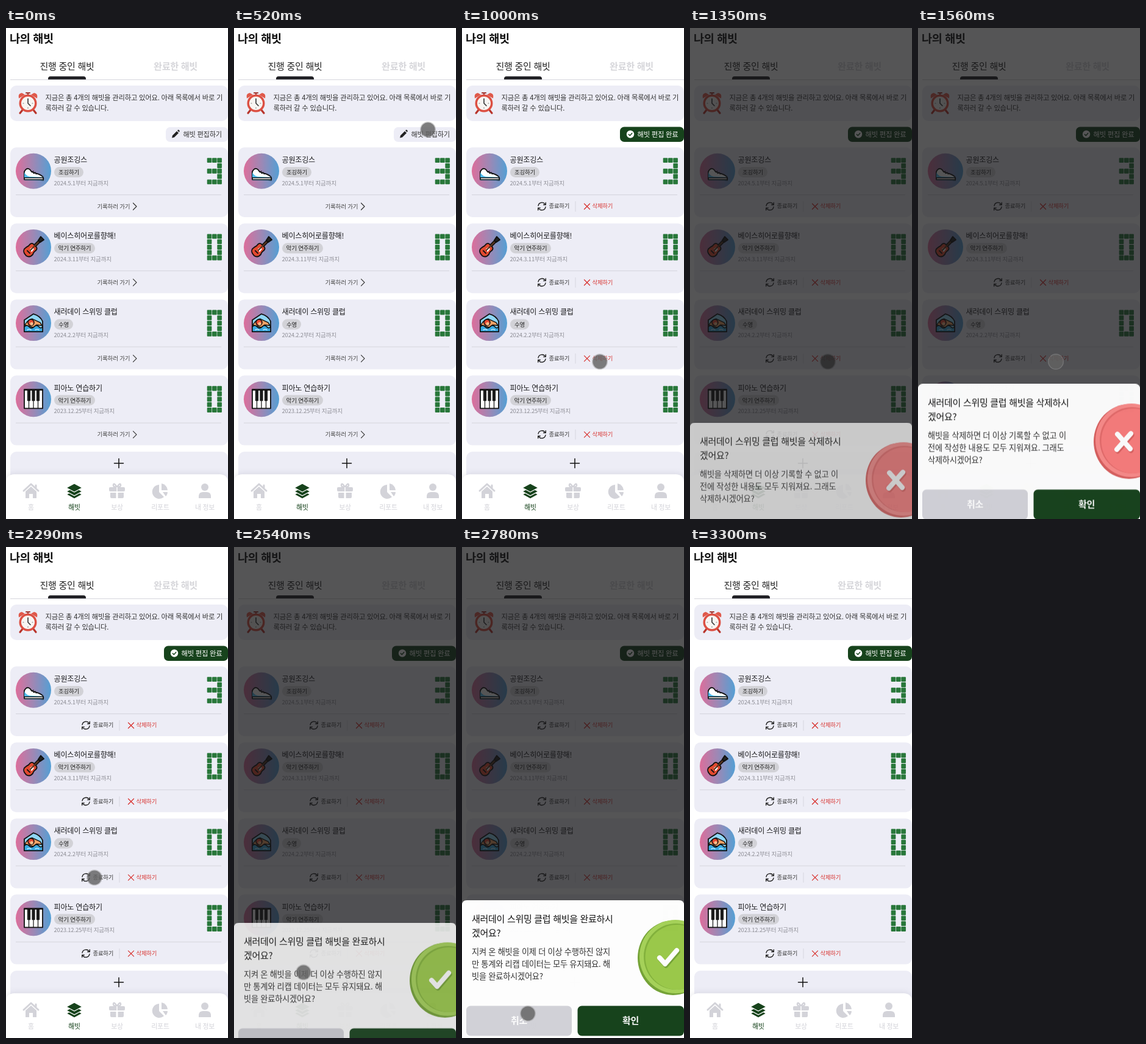
Recreate the animation shown at these times as an HTML page. Size 364 by 802 pixels, loop 3660 ms.

```html
<!DOCTYPE html>
<html lang="ko">
<head>
<meta charset="utf-8">
<title>나의 해빗</title>
<style>
html, body { margin: 0; width: 100%; height: 100%; overflow: hidden; background: #fff; }
svg { display: block; }
text { font-family: "Noto Sans CJK KR", "Noto Sans CJK", "Noto Sans", sans-serif; letter-spacing: -.02em; }
.view, .edit, .dim, .sheet, .cursor, .held { animation: 3660ms linear infinite; }
.view { animation-name: view; animation-timing-function: step-end; }
.edit { animation-name: edit; animation-timing-function: step-end; }
.dim { animation-name: dim; }
.remove { animation-name: remove; }
.finish { animation-name: finish; }
.cursor { animation-name: move, show; animation-timing-function: ease-in-out, step-end; }
.held { animation-name: held; animation-timing-function: step-end; }
.nav { filter: drop-shadow(0 -2px 5px rgba(60, 60, 90, .1)); }

@keyframes view { 0% { opacity: 1 } 17.5%, 100% { opacity: 0 } }
@keyframes edit { 0% { opacity: 0 } 17.5%, 100% { opacity: 1 } }
@keyframes dim {
  0%, 32.79%, 59.29%, 63.66%, 86.07%, 100% { opacity: 0 }
  36.34%, 54.37%, 68.31%, 79.23% { opacity: .73 }
}
@keyframes remove {
  0%, 34.15% { transform: translateY(227px); opacity: 0 }
  35.52% { transform: translateY(125px); opacity: .45 }
  36.89% { transform: translateY(70px); opacity: .69 }
  39.62% { transform: translateY(21px); opacity: .905 }
  42.35% { transform: translateY(7px); opacity: .97 }
  45.9%, 54.37% { transform: none; opacity: 1 }
  55.74% { transform: translateY(102px); opacity: .55 }
  57.1% { transform: translateY(157px); opacity: .31 }
  59.84% { transform: translateY(211px); opacity: .07 }
  60.93%, 100% { transform: translateY(227px); opacity: 0 }
}
@keyframes finish {
  0%, 65.3% { transform: translateY(227px); opacity: 0 }
  66.67% { transform: translateY(125px); opacity: .45 }
  68.03% { transform: translateY(70px); opacity: .69 }
  69.4% { transform: translateY(39px); opacity: .83 }
  71.31% { transform: translateY(17px); opacity: .925 }
  73.77% { transform: translateY(6px); opacity: .975 }
  75.96% { transform: translateY(2px); opacity: .99 }
  77.32%, 79.23% { transform: none; opacity: 1 }
  80.6% { transform: translateY(102px); opacity: .55 }
  81.97% { transform: translateY(157px); opacity: .31 }
  84.7% { transform: translateY(211px); opacity: .07 }
  86.07%, 100% { transform: translateY(227px); opacity: 0 }
}
@keyframes move {
  0%, 18.85% { transform: translate(318px, 166px) }
  26.23%, 46.2% { transform: translate(226px, 545px) }
  52%, 54.64% { transform: translate(67px, 762px) }
  60.1%, 63.3% { transform: translate(145px, 540px); animation-timing-function: linear }
  69.4% { transform: translate(114px, 694px); animation-timing-function: ease-out }
  73.8%, 100% { transform: translate(108px, 762px) }
}
@keyframes show {
  0% { opacity: 0 }
  14.2% { opacity: 1 }
  31.97% { opacity: 0 }
  39% { opacity: 1 }
  80.6%, 100% { opacity: 0 }
}
@keyframes held {
  0% { opacity: 0 }
  31.97% { opacity: 1 }
  39%, 100% { opacity: 0 }
}
</style>
</head>
<body>
<script>
const GREEN = '#17431c', GRAY = '#d3d3d9', CARD = '#ededf6', RED = '#d8322f';

// Text is placed by the middle of its line.
const text = (x, y, size, str, fill = '#222', weight = 400, anchor = 'start') =>
  `<text x="${x}" y="${(y + size * .37).toFixed(2)}" font-size="${size}" fill="${fill}" font-weight="${weight}" text-anchor="${anchor}">${str}</text>`;
const rect = (x, y, w, h, r, fill) =>
  `<rect x="${x}" y="${y}" width="${w}" height="${h}" rx="${r}" fill="${fill}"/>`;
const disc = (x, y, r, fill, more = '') => `<circle cx="${x}" cy="${y}" r="${r}" fill="${fill}" ${more}/>`;
const path = (d, fill, stroke = 'none', w = 1.5) =>
  `<path d="${d}" fill="${fill}" stroke="${stroke}" stroke-width="${w}" stroke-linecap="round" stroke-linejoin="round"/>`;
const line = (d, stroke, w) => path(d, 'none', stroke, w);
const at = (x, y, body, cls = '') => `<g transform="translate(${x} ${y})"${cls && ` class="${cls}"`}>${body}</g>`;
const group = (cls, body) => `<g class="${cls}">${body}</g>`;

const touch = disc(0, 0, 13, 'rgba(150,150,150,.5)') + disc(0, 0, 11.5, 'rgba(85,85,85,.65)');

const shoe =
  path('M-15 12V1q2-4 5-5 4 0 6 4 4 3 9 4 7 2 10 5 2 2 1 6Z', '#fff', '#111', 1.8) +
  path('M-15 2q3 6 9 7l22 1v5h-31Z', '#4db8e8') +
  path('M-15 11h31v3h-31Z', '#fff', '#111', 1.6) +
  line('M-3 2l3-2M0 4l3-2M4 5l2-1', '#111', 1.2);

const guitar =
  line('M-3 3L11-11', '#111', 5.5) +
  path('M8-11l4-6 5 5-6 4Z', '#222', '#111', 2) +
  path('M-8-2q4-6 8-3 2 3 5 5 2 4-3 7-2 2-3 5-5 6-11 2-6-6-3-11 3-3 7-5Z', '#e2492f', '#111', 1.8) +
  path('M-6 3l4-3 3 3-4 5Z', '#fff') +
  line('M-5 5L8-8', '#5a3520', 2.2) +
  line('M-10 6l4 4', '#111', 2);

const swimmer =
  path('M-15 14V-5L0-15q11 3 15 12v17Z', '#8fd6f4', '#111', 1.8) +
  path('M-14 3q5-9 12-10l13 6 3 5-9-1-5 4Z', '#f0a266', '#111', 1.5) +
  disc(-4, -1, 5, '#e84a32', 'stroke="#111" stroke-width="1.5"') +
  disc(-3, 1, 2.6, '#f7c08d') +
  path('M-15 6q4-4 8 0t8 0 8 0 6-1v9h-30Z', '#39a9e0', '#111', 1.5) +
  line('M-10 11q3-2 6 0M3 11q3-2 6 0', '#c9efff', 1.4);

const piano =
  path('M-15-16h30v31h-30Z', '#fff', '#111', 1.8) +
  line('M-7.5 3v12M0 3v12M7.5 3v12', '#111', 1.2) +
  [-7.5, 0, 7.5].map(x => rect(x - 2.6, -16, 5.2, 19, .8, '#1c1c1c')).join('') +
  line('M-15-15h30', '#111', 2);

const digits = { 0: ['111', '101', '101', '101', '111'], 3: ['111', '001', '111', '001', '111'] };
const digit = n => digits[n].map((row, j) => [...row].map((on, i) =>
  on > 0 ? rect(329.7 + i * 8.3, 17.2 + j * 8.8, 7.6, 7.9, 1, '#28773a') : '').join('')).join('');

const refresh = at(131, 96.3,
  line('M-6-1A6.2 6.2 0 0 1 5.4-3.2M6 1A6.2 6.2 0 0 1-5.4 3.2', '#222', 1.4) +
  line('M6.3-6.2v3.6H2.7M-6.3 6.2V2.6h3.6', '#222', 1.4));

const habits = [
  ['공원조깅스', '조깅하기', 48, '2024.5.1', 3, shoe],
  ['베이스히어로를향해!', '악기 연주하기', 67, '2024.3.11', 0, guitar],
  ['새러데이 스위밍 클럽', '수영', 31, '2024.2.2', 0, swimmer],
  ['피아노 연습하기', '악기 연주하기', 67, '2023.12.25', 0, piano]
];

const card = ([name, kind, pill, date, count, icon], i) => at(0, 195 + i * 124.2,
  rect(7, 0, 357, 114, 10, CARD) +
  disc(45, 38.7, 29, 'url(#blend)') + at(45, 38.7, icon) +
  text(78.5, 20.5, 12.1, name, '#1b1b1d', 500) +
  rect(79, 32, pill, 17, 8.5, '#d2d2d7') +
  text(79 + pill / 2, 40.7, 9.5, kind, '#222', 400, 'middle') +
  text(78.5, 58, 9.5, date + '부터 지금까지', '#8e8e96') +
  digit(count) +
  rect(16, 77, 337, 1, 0, '#d4d4dc') +
  group('view', text(149.5, 96, 9.5, '기록하러 가기', '#444') + line('M208.5 91l5.5 5.5-5.5 5.5', '#333', 1.2)) +
  group('edit', refresh + text(142.5, 96, 9.4, '종료하기', '#333') +
    rect(185.5, 88, 1, 17, 0, '#d6d6de') +
    line('M200.5 92l9 9M209.5 92l-9 9', RED, 1.3) + text(213.5, 96, 9.4, '삭제하기', RED)));

const clock = at(36, 123,
  line('M-9 11l-4 5M9 11l4 5', '#b8352c', 3.2) +
  path('M-15-8q-2-8 5-9l5 3Z', '#e0594a') + path('M15-8q2-8-5-9l-5 3Z', '#e0594a') +
  line('M-3-17h6M0-17v4', '#a33b35', 2.2) +
  disc(0, 0, 14.5, '#dc5043') + disc(0, 0, 11, '#f8f5f2') +
  line('M0-8v1M0 8v-1M-8 0h1M8 0h-1', '#777', 1.2) +
  line('M0 0V-7M0 0l4 4', '#333', 1.6));

const pencil = at(278, 173.5,
  path('M-6 6l1-4L2-5 5-2-2 5Z', '#222') + path('M3-6l1-1q1-.5 2 .5t.6 2l-1 1Z', '#222'));

const header =
  text(6, 17, 18.6, '나의 해빗', '#111', 700) +
  text(100, 62.5, 15, '진행 중인 해빗', '#222', 500, 'middle') +
  text(278, 62.5, 15.1, '완료한 해빗', '#d6d6da', 700, 'middle') +
  rect(7, 84, 357, 1, 0, '#d6d6dc') +
  path('M69 84v-1q0-4 4-4h54q4 0 4 4v1Z', '#222226') +
  rect(7, 94, 357, 58, 10, CARD) + clock +
  text(64.5, 114, 11.35, '지금은 총 4개의 해빗을 관리하고 있어요. 아래 목록에서 바로 기', '#333') +
  text(64.5, 131, 11.35, '록하러 갈 수 있습니다.', '#333') +
  group('view', rect(262, 162, 102, 24, 7, CARD) + pencil + text(290.5, 173.5, 11.2, '해빗 편집하기', '#333')) +
  group('edit', rect(259, 161.5, 105, 24.5, 7, GREEN) + disc(276, 173.5, 6.2, '#fff') +
    line('M273.3 173.7l2 2 3.4-3.8', GREEN, 1.5) + text(287.5, 173.5, 11.3, '해빗 편집 완료', '#fff', 500));

const tabs = [
  [41, '홈', c => path('M-12 0L0-11 12 0M8-9v4', 'none', c, 3) + path('M-9 1L0-7 9 1v11H3V5h-6v7h-6Z', c)],
  [112, '해빗', c => [6, 1, -5].map(y =>
    path(`M-13 ${y}L0 ${y - 7} 13 ${y} 0 ${y + 7}Z`, c, '#fff', 1.4)).join('')],
  [182, '보상', c => rect(-13, -6, 26, 7, 2, c) + path('M-11 3h9.5v9H-9q-2 0-2-2ZM1.500 3H11v7q0 2-2 2H1.500Z', c) +
    line('M0-6q-7 0-6-4t6 4q7 0 6-4t-6 4', c, 2.4) + rect(-.7, -6, 1.4, 18, 0, '#fff')],
  [253, '리포트', c => path('M-2-10V2l8 8A11.500 11.500 0 1 1-2-10Z', c) + path('M2-12A12 12 0 0 1 12-1H2Z', c) +
    path('M4 2h8q0 4-3 7Z', c)],
  [326, '내 정보', c => disc(0, -6, 6, c) + path('M-10 12V9q0-7 7-7h6q7 0 7 7v3Z', c)]
];

const nav = group('nav', path('M0 802V743q0-14 14-14h336q14 0 14 14v59Z', '#fff')) +
  tabs.map(([x, label, icon], i) => {
    const c = i === 1 ? GREEN : GRAY;
    return at(x, 756, icon(c)) + text(x, 783, 10.9, label, c, 500, 'middle');
  }).join('');

const coin = ([edge, rim, face, shine], mark) =>
  `<g><ellipse cx="346" cy="669" rx="58" ry="61" fill="${edge}"/>
  <ellipse cx="350" cy="667" rx="59" ry="60" fill="${rim}"/>
  <ellipse cx="351" cy="667" rx="53" ry="54" fill="${shine}"/>
  <ellipse cx="352.500" cy="668" rx="52" ry="53" fill="${face}"/></g>` +
  at(1.5, 2.5, line(mark, edge, 8)) + line(mark, '#fff', 8);

const sheet = (cls, verb, lines, colors, mark) => group('sheet ' + cls,
  path('M0 802V583q0-8 8-8h348q8 0 8 8v219Z', '#fff') +
  text(16, 605, 15, `새러데이 스위밍 클럽 해빗을 ${verb}하시`, '#151515', 500) +
  text(16, 628, 15, '겠어요?', '#151515', 500) +
  lines.map((s, i) => text(16, 659 + i * 20, 13.25, s, '#333')).join('') +
  coin(colors, mark) +
  rect(7, 747.500, 173, 49, 7, GRAY) + text(93.500, 771.500, 15, '취소', '#fff', 600, 'middle') +
  rect(189.500, 747.500, 174.500, 49, 7, GREEN) + text(276.500, 771.500, 15, '확인', '#fff', 600, 'middle'));

document.body.innerHTML = `<svg width="364" height="802" viewBox="0 0 364 802">
<defs><linearGradient id="blend"><stop stop-color="#dc6e9b"/><stop offset=".5" stop-color="#9d88b5"/><stop offset="1" stop-color="#549fd4"/></linearGradient></defs>
${rect(0, 0, 364, 802, 0, '#fff')}
${header}
${habits.map(card).join('')}
${rect(7, 692, 357, 60, 10, CARD)}
${line('M177.500 711h15M185 703.500v15', '#111', 1.5)}
${nav}
${at(226, 545, group('held', touch))}
<rect class="dim" width="364" height="802" fill="#161618"/>
${sheet('remove', '삭제', ['해빗을 삭제하면 더 이상 기록할 수 없고 이', '전에 작성한 내용도 모두 지워져요. 그래도', '삭제하시겠어요?'],
    ['#d9605f', '#f98b8a', '#f87c7c', '#e56b6b'], 'M327 657l21 24M349 656l-23 26')}
${sheet('finish', '완료', ['지켜 온 해빗을 이제 더 이상 수행하진 않지', '만 통계와 리캡 데이터는 모두 유지돼요. 해', '빗을 완료하시겠어요?'],
    ['#76a437', '#a6d35a', '#9bca4a', '#83b33c'], 'M324 669l9 10 19-22')}
${group('cursor', touch)}
</svg>`;
</script>
</body>
</html>
```
